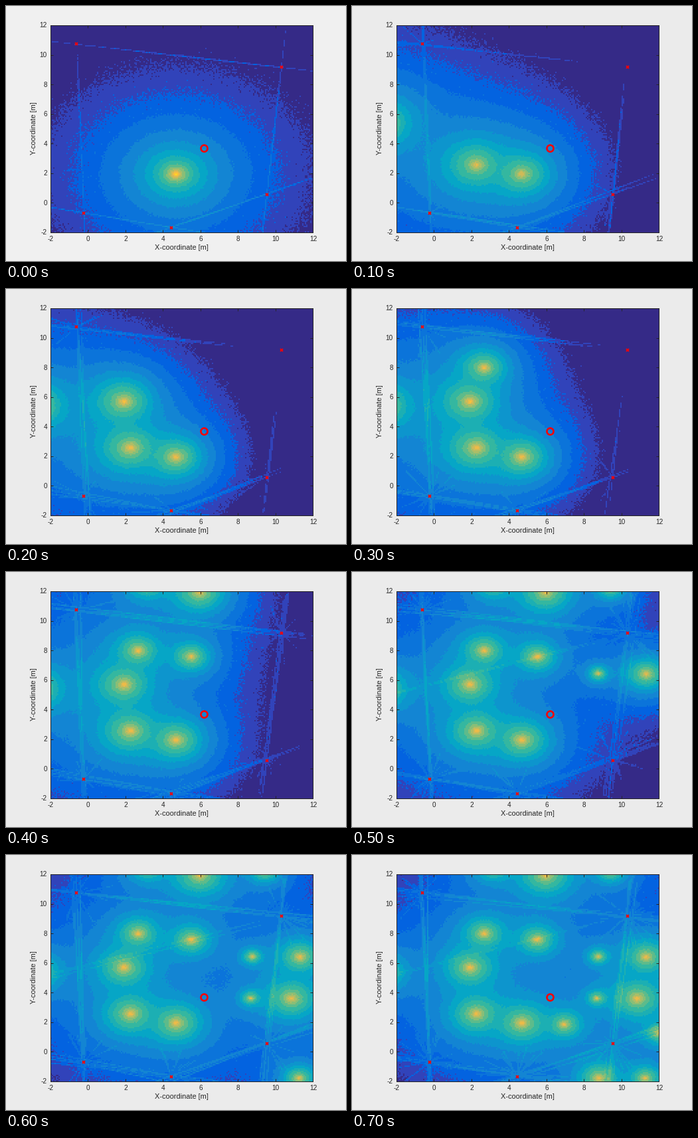
Write a matplotlib script that moves like this. It is 512x384 px and loops after 0.8 s.

```python
import numpy as np
import matplotlib.pyplot as plt
from matplotlib.animation import FuncAnimation
from matplotlib.colors import LinearSegmentedColormap

W, H = 512, 384
LEFT, RIGHT, TOP, BOTTOM = 67, 462, 29, 341
FRAMES, INTERVAL = 8, 100
BANDS = 16
LOW, HIGH = -2, 12
PT = 0.72  # points per pixel at 100 dpi
INK = "#262626"

PALETTE = LinearSegmentedColormap.from_list("sea", [
    (0, "#352a87"), (.0625, "#3243ba"), (.125, "#0363e1"), (.25, "#1485d4"),
    (.38, "#06a7c6"), (.51, "#38b99e"), (.64, "#92bf73"), (.80, "#e9b94e"),
    (.88, "#ffc534"), (1, "#f9fb0e")])

# Sources (x, y, size) that join at each step
SOURCES = [
    [(4.70, 1.93, .88)],
    [(2.27, 2.55, .88), (-2.8, 5.4, .7)],
    [(1.92, 5.70, .85)],
    [(2.68, 8.00, .7)],
    [(5.50, 7.60, .65), (5.95, 12, .9), (3.2, 12.6, .6)],
    [(8.78, 6.45, .35), (11.35, 6.42, .75), (9.45, 12.3, .5)],
    [(10.88, 3.60, .9), (8.70, 3.62, .35), (11.3, -1.82, .55)],
    [(6.95, 1.83, .6), (8.80, -1.82, .7), (12.1, 1.25, .5)],
]
ANCHORS = [(-.62, 10.75), (10.35, 9.18), (9.57, .58), (4.45, -1.7), (-.23, -.72)]
TARGET = (6.2, 3.72)
CROSS = [(-.5, 5.68), (7.8, 8.37)]

X, Y = np.meshgrid(np.linspace(LOW, HIGH, 197), np.linspace(LOW, HIGH, 156))


def field(step):
    """Logarithmic falloff from the joint pull of all sources so far."""
    pull = 0
    for x, y, size in sum(SOURCES[:step + 1], []):
        distance = np.hypot(np.hypot(X - x, Y - y) / size, .12)
        pull = pull + distance ** -3
    slope = min(.21 + .035 * step, .28)
    value = .51 + slope * np.log(pull) / 3
    lean = step * (7 - step) ** 2 / 36
    value += .01 * lean * (5 - X)
    if step:
        value = np.where(value > .5, .5 + (value - .5) * .6, value)
    return value


def ray(start, end, gain):
    (x0, y0), (dx, dy) = start, end - start
    length = np.hypot(dx, dy)
    along = ((X - x0) * dx + (Y - y0) * dy) / length
    off = ((X - x0) * dy - (Y - y0) * dx) / length
    return gain * np.exp(-(off / .045) ** 2) * ((along >= 0) & (along <= length))


def bundle(a, b, count, rng, gain, reach=2.6):
    """Nearly parallel rays through two points, overshooting both."""
    a, b = np.array(a), np.array(b)
    light = 0
    for n in range(count):
        spread = .12 * (n > 0)
        start, end = a + rng.normal(0, spread, 2), b + rng.normal(0, spread, 2)
        overshoot = (end - start) / np.linalg.norm(end - start) * reach
        light = np.maximum(light, ray(start - overshoot, end + overshoot,
                                      gain * rng.uniform(.5, 1)))
    return light


def burst(center, count, rng):
    center = np.array(center)
    light = 0
    for angle in rng.uniform(0, 2 * np.pi, count):
        tip = center + rng.uniform(.6, 2.2) * np.array([np.cos(angle), np.sin(angle)])
        light = np.maximum(light, ray(center, tip, .06))
    return light


def glow(step, rng):
    light = 0
    for here, following in zip(ANCHORS, ANCHORS[1:] + ANCHORS[:1]):
        light = np.maximum(light, bundle(here, following, min(1 + step, 6), rng, .11))
        light = np.maximum(light, burst(here, 3 * step, rng))
    if step >= 5:
        light = np.maximum(light, bundle(*CROSS, 3, rng, .06, 1.5))
    return light


def heatmap(step):
    rng = np.random.default_rng(40 + step)
    value = field(step)
    fade = np.clip(1 + 8 * value, 0, 1)
    grain = np.where(value < .17, .012, .004)
    value = np.maximum(value + rng.normal(size=X.shape) * grain, 0)
    value = np.clip(value + fade * glow(step, rng), 0, .999)
    return PALETTE(np.floor(value * BANDS) / BANDS)


fig = plt.figure(figsize=(W / 100, H / 100), dpi=100)
ax = fig.add_axes([LEFT / W, 1 - BOTTOM / H, (RIGHT - LEFT) / W, (BOTTOM - TOP) / H])
maps = [heatmap(step) for step in range(FRAMES)]
image = ax.imshow(maps[0], extent=(LOW, HIGH, LOW, HIGH), origin="lower",
                  aspect="auto", interpolation="nearest")

ticks = range(LOW, HIGH + 1, 2)
ax.set(xlim=(LOW, HIGH), ylim=(LOW, HIGH), xticks=ticks, yticks=ticks)
ax.tick_params(direction="in", top=True, right=True, length=4 * PT, width=PT,
               color=INK, labelbottom=False, labelleft=False)
for spine in ax.spines.values():
    spine.set(color=INK, linewidth=PT)


def label(x, y, text, size, **style):
    fig.text(x / W, 1 - y / H, text, fontsize=size * PT, color=INK,
             family="Liberation Sans", **style)


for tick in ticks:
    along = (tick - LOW) / (HIGH - LOW)
    label(LEFT + along * (RIGHT - LEFT) + .5, 354, str(tick), 10, ha="center")
    label(62, BOTTOM - along * (BOTTOM - TOP) + 3.5, str(tick), 10, ha="right")
label(264.5, 367, "X-coordinate [m]", 11, ha="center")
label(42, 184.5, "Y-coordinate [m]", 11, ha="center", va="center", rotation=90)

ax.plot(*zip(*ANCHORS), "x", color="red", markersize=5 * PT,
        markeredgewidth=1.8 * PT, zorder=5)
ax.plot(*TARGET, "o", markerfacecolor="none", markeredgecolor="red",
        markersize=10 * PT, markeredgewidth=2.6 * PT, zorder=5)


def update(step):
    image.set_data(maps[step])
    fig.set_facecolor("#f0f0f0" if step == 0 else "#ebebeb")
    return [image]


anim = FuncAnimation(fig, update, frames=FRAMES, interval=INTERVAL,
                     repeat=True, repeat_delay=0, blit=False)
plt.show()
```
